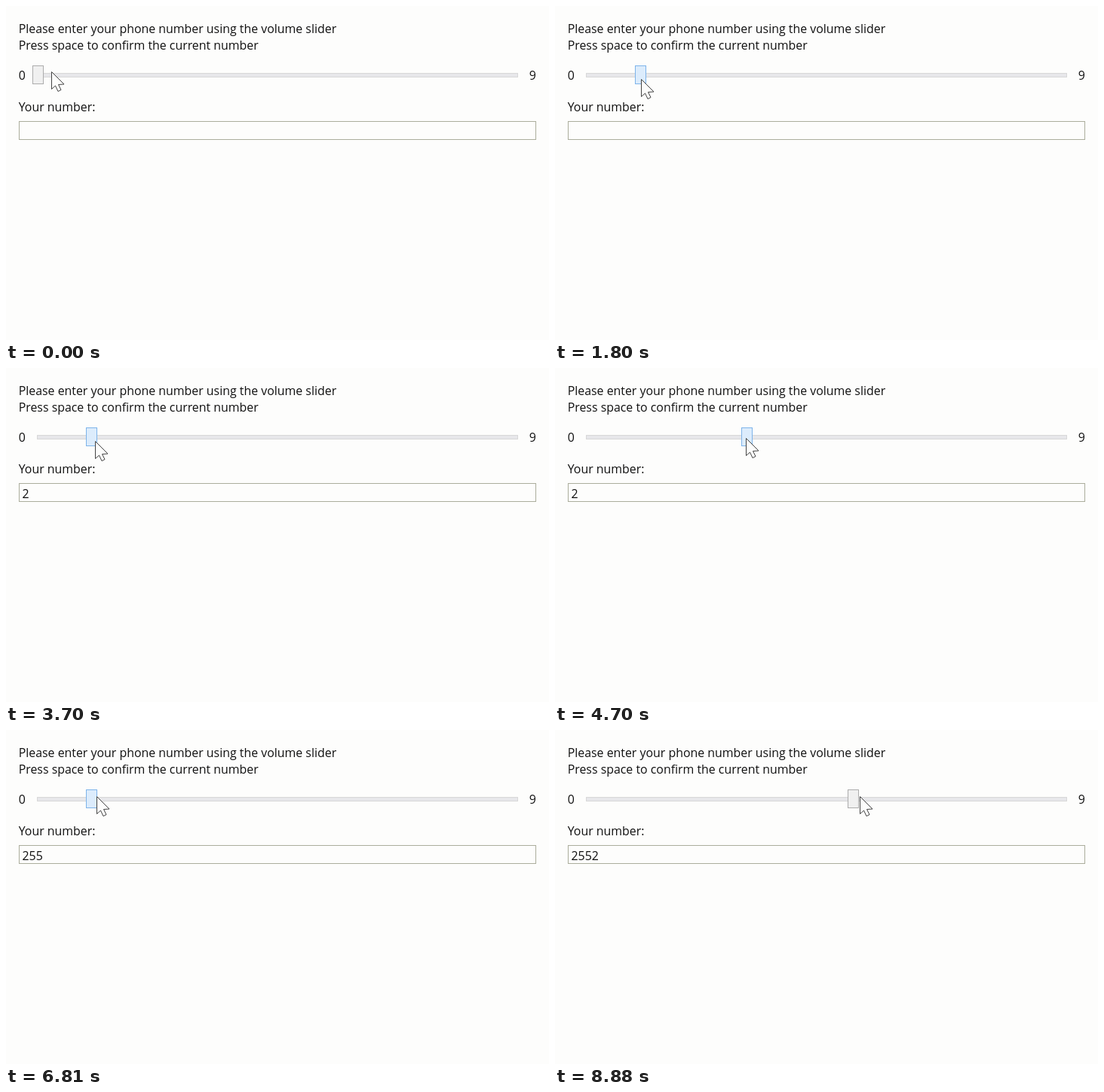
An HTML page that plays this animation: 720x444 px, repeating every 9.02 s.

```html
<!DOCTYPE html>
<html lang="en">
<head>
<meta charset="utf-8">
<title>Volume slider phone input</title>
<style>
  html, body { margin: 0; width: 100%; height: 100%; overflow: hidden; background: #fdfdfc; }
  svg { display: block; width: 720px; height: 444px; }
  text { font: 15.9px "Open Sans", "Noto Sans", sans-serif; fill: #111; }
  #thumb { fill: #f0f0f0; stroke: #acacac; }
  #thumb.active { fill: #dcecfc; stroke: #7eb4ea; }
  #panel rect { fill: #96fd90; }
  #panel text { font-size: 23.7px; text-anchor: middle; }
  #cursor { fill: #fdfdfc; stroke: #444; }
</style>
</head>
<body>
<svg viewBox="0 0 720 444">
  <text x="16.7" y="35.5">Please enter your phone number using the volume slider</text>
  <text x="16.7" y="58">Press space to confirm the current number</text>
  <text x="16.7" y="97.5">0</text>
  <text x="693.7" y="97.5">9</text>
  <rect x="41.5" y="89.5" width="637" height="5" fill="#e7e7ea" stroke="#d8d8d8"/>
  <rect id="thumb" y="79.5" width="14" height="24"/>
  <text x="16.7" y="140">Your number:</text>
  <rect x="17.5" y="153.5" width="685" height="24" fill="none" stroke="#abad9c"/>
  <text id="number" x="21.5" y="172.5"></text>
  <g id="panel">
    <rect x="191" y="246" width="338" height="113"/>
    <text x="360" y="313">Space pressed</text>
  </g>
  <path id="cursor" d="M.5 .5v23l5-4.5 3.5 7.5 4-2-3.5-7 7.5-.5z"/>
</svg>
<script>
const LOOP = 9020;
const STEP = 70.6;
const DIGITS = "2552";
const PRESSES = [3050, 5250, 6000, 7100];
const PANEL_TIME = 520;

// Each pointer move eases in on top of the ones before it
const MOVES = [
  { at: 0, time: 970, dx: 24, dy: 0 },
  { at: 1000, time: 300, dx: -36, dy: 6 },
  { at: 1500, time: 350, dx: 70, dy: 4 },
  { at: 3900, time: 750, dx: 135, dy: -4 },
  { at: 6500, time: 260, dx: -133, dy: -5 },
  { at: 7650, time: 750, dx: 284, dy: 0 }
];

const [thumb, number, panel, cursor] =
  ["thumb", "number", "panel", "cursor"].map(id => document.getElementById(id));

function ease(k) {
  k = Math.min(1, Math.max(0, k));
  return k * k * (3 - 2 * k);
}

function draw(t) {
  let x = 60, y = 87;
  for (const { at, time, dx, dy } of MOVES) {
    const k = ease((t - at) / time);
    x += dx * k;
    y += dy * k;
  }
  const value = Math.max(0, Math.round((x - 55) / STEP));
  const active = (t >= 1250 && t < 1900) || (t >= 2900 && t < 8860);
  const entered = PRESSES.filter(press => t >= press);

  cursor.setAttribute("transform", `translate(${Math.round(x)} ${Math.round(y)})`);
  thumb.setAttribute("x", Math.round(35 + value * STEP) + 0.5);
  thumb.classList.toggle("active", active);
  number.textContent = DIGITS.slice(0, entered.length);
  panel.style.display = t - entered.at(-1) < PANEL_TIME ? "" : "none";
}

let start;
function tick(now) {
  start ??= now;
  draw((now - start) % LOOP);
  requestAnimationFrame(tick);
}
draw(0);
requestAnimationFrame(tick);
</script>
</body>
</html>
```
